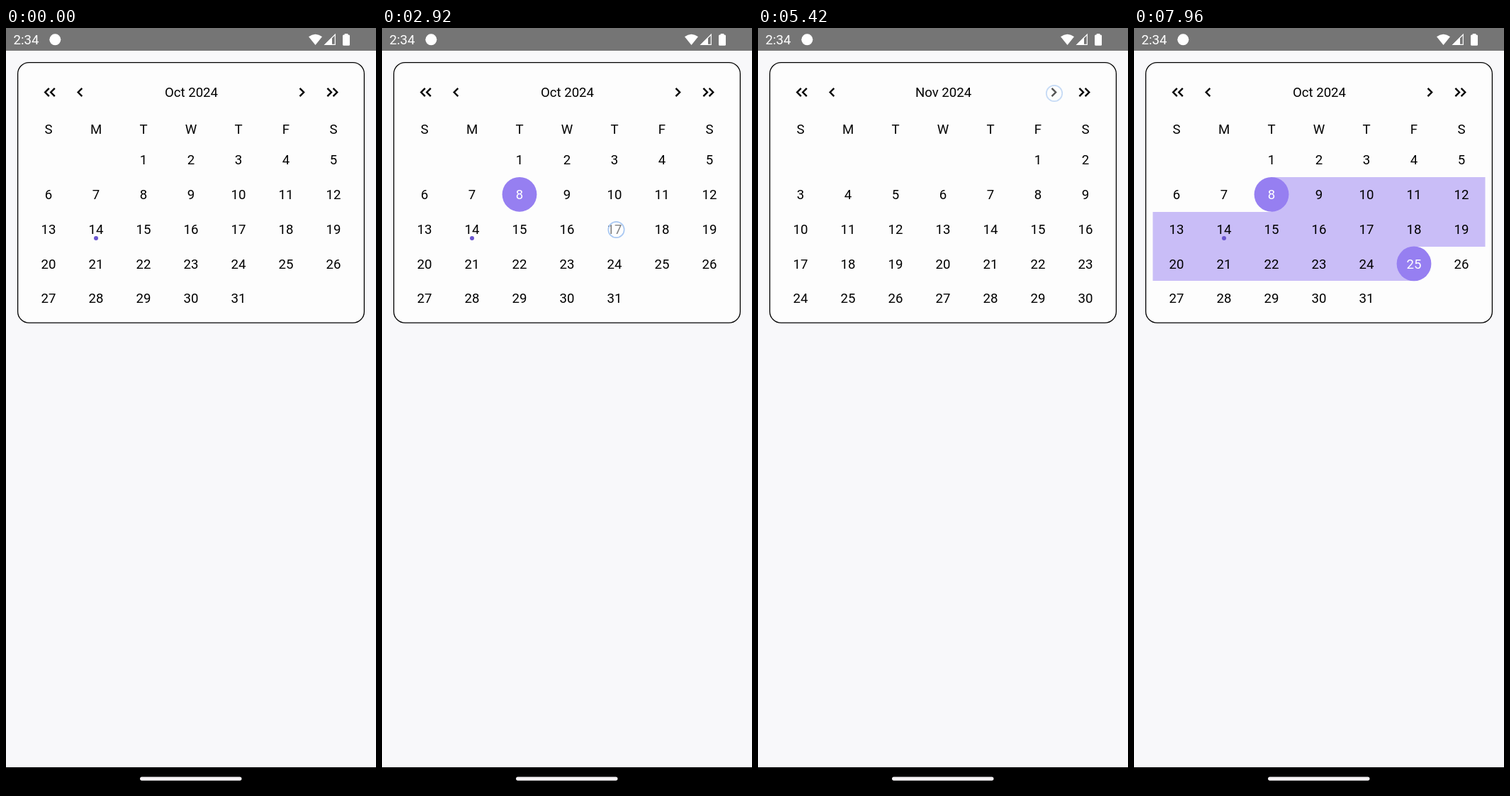
Recreate the animation shown at these times as an HTML page with a canvas. Size 522 by 1073 pixels, loop 8000 ms.

```html
<!DOCTYPE html>
<html lang="en">
<head>
<meta charset="utf-8">
<title>Calendar range picker</title>
<style>
  html, body { margin: 0; width: 100%; height: 100%; overflow: hidden; background: #f8f8fa; }
  canvas { display: block; width: 522px; height: 1073px; }
</style>
</head>
<body>
<canvas id="stage"></canvas>
<script>
const WIDTH = 522, HEIGHT = 1073, LOOP = 8000;
const LEFT = 26.5, TOP = 161.1, CELL_W = 67, CELL_H = 48.8;
const ARROW_Y = 90.5;
const MONTHS = ['Jan', 'Feb', 'Mar', 'Apr', 'May', 'Jun', 'Jul', 'Aug', 'Sep', 'Oct', 'Nov', 'Dec'];

// Each tap changes the calendar at the moment of release.
const TAPS = [
  { release: 1930, x: 195, y: 235, set: { start: 8 } },
  { release: 2960, x: 330.5, y: 284, set: { end: 17 } },
  { release: 4440, x: 396, y: 333, set: { end: 25 } },
  { release: 5380, x: 418, y: 92, button: 417.5, set: { month: 10 } },
  { release: 6320, x: 461, y: 92, button: 460.5, set: { year: 2025 } },
  { release: 6980, x: 62, y: 92, button: 61.5, set: { year: 2024 } },
  { release: 7400, x: 105, y: 92, button: 104.5, set: { month: 9 } }
];

const canvas = document.getElementById('stage');
const ctx = canvas.getContext('2d');
const ratio = window.devicePixelRatio || 1;
canvas.width = WIDTH * ratio;
canvas.height = HEIGHT * ratio;

const clamp = v => Math.max(0, Math.min(1, v));
const easeOut = v => 1 - (1 - clamp(v)) ** 3;
const columnX = column => LEFT + (column + 0.5) * CELL_W;
const rowTop = row => Math.round(TOP + row * CELL_H);

function rect(x, y, w, h, color) {
  ctx.fillStyle = color;
  ctx.fillRect(x, y, w, h);
}

function roundRect(x, y, w, h, r, fill, stroke) {
  ctx.beginPath();
  ctx.roundRect(x, y, w, h, r);
  ctx.fillStyle = fill;
  ctx.fill();
  if (stroke) {
    ctx.strokeStyle = stroke;
    ctx.lineWidth = 1.3;
    ctx.stroke();
  }
}

function circle(x, y, r, color) {
  ctx.beginPath();
  ctx.arc(x, y, r, 0, Math.PI * 2);
  ctx.fillStyle = color;
  ctx.fill();
}

function polygon(color, ...points) {
  ctx.beginPath();
  points.forEach(([x, y]) => ctx.lineTo(x, y));
  ctx.closePath();
  ctx.fillStyle = color;
  ctx.fill();
}

function text(string, x, centerY, color = '#000', align = 'center') {
  ctx.font = '18.6px Roboto, sans-serif';
  ctx.textAlign = align;
  ctx.fillStyle = color;
  ctx.fillText(string, x, centerY + 6.6);
}

function chevron(x, direction) {
  ctx.beginPath();
  ctx.moveTo(x - 2.8 * direction, ARROW_Y - 5.6);
  ctx.lineTo(x + 2.8 * direction, ARROW_Y);
  ctx.lineTo(x - 2.8 * direction, ARROW_Y + 5.6);
  ctx.strokeStyle = '#000';
  ctx.lineWidth = 2.4;
  ctx.stroke();
}

function drawSystemBars() {
  rect(0, 0, WIDTH, 32, '#757575');
  text('2:34', 10.5, 16.5, '#fff', 'left');
  circle(69.3, 16.3, 8, '#fff');

  ctx.beginPath();
  ctx.moveTo(436.5, 24);
  ctx.lineTo(427, 12.3);
  ctx.quadraticCurveTo(436.5, 5.2, 446, 12.3);
  ctx.fillStyle = '#fff';
  ctx.fill();

  polygon('#fff', [449, 24], [460, 13], [460, 24]);
  ctx.beginPath();
  ctx.moveTo(450, 23.4);
  ctx.lineTo(464.3, 9.3);
  ctx.lineTo(464.3, 23.4);
  ctx.closePath();
  ctx.strokeStyle = '#fff';
  ctx.lineWidth = 1.2;
  ctx.stroke();

  roundRect(475, 9.5, 10, 15.3, 1.5, '#fff');
  rect(477.7, 8, 4.6, 2, '#fff');

  rect(0, 1041, WIDTH, 32, '#000');
  roundRect(189, 1054.4, 143.5, 5.3, 2.65, '#f4f1f4');
}

function drawRange(firstSlot, lastSlot) {
  for (let row = Math.floor(firstSlot / 7); row <= Math.floor(lastSlot / 7); row++) {
    const from = firstSlot < row * 7 ? LEFT : columnX(firstSlot - row * 7);
    const to = lastSlot >= row * 7 + 7 ? LEFT + 7 * CELL_W : columnX(lastSlot - row * 7);
    rect(from, rowTop(row), to - from, rowTop(row + 1) - rowTop(row), '#c9bdf7');
  }
}

function drawCalendar({ year, month, start, end }) {
  const offset = new Date(year, month, 1).getDay();
  const days = new Date(year, month + 1, 0).getDate();
  const rows = Math.ceil((offset + days) / 7);
  const isOctober = year === 2024 && month === 9;

  roundRect(16.6, 48.6, 488.8, 122.6 + rows * CELL_H, 16, '#fdfdfd', '#000');
  text(`${MONTHS[month]} ${year}`, 261.5, ARROW_Y);
  [58, 66, 104.5].forEach(x => chevron(x, -1));
  [417.3, 456.2, 464.4].forEach(x => chevron(x, 1));
  [...'SMTWTFS'].forEach((letter, column) => text(letter, columnX(column), 142));

  if (isOctober && end) drawRange(offset + start - 1, offset + end - 1);
  for (let day = 1; day <= days; day++) {
    const slot = offset + day - 1;
    const x = columnX(slot % 7);
    const y = TOP + (Math.floor(slot / 7) + 0.5) * CELL_H;
    const selected = isOctober && (day === start || day === end);
    if (selected) circle(x, y, CELL_H / 2, '#967ff1');
    text(day, x, y, selected ? '#fff' : '#000');
    if (isOctober && day === 14) circle(x, y + 13, 3, '#6a55cf');
  }
}

function drawRipple(tap, t) {
  const age = t - tap.release - 60;
  if (!tap.button || age < 0 || age > 410) return;
  const alpha = 0.12 * clamp(age / 75) * (1 - clamp((age - 260) / 150));
  circle(tap.button, ARROW_Y, 21.5 * (0.3 + 0.7 * easeOut(age / 180)), `rgba(28,27,31,${alpha})`);
}

function drawTouch(tap, t) {
  const age = t - tap.release;
  if (age < -100 || age > 120) return;
  ctx.globalAlpha = 1 - clamp(age / 120);
  circle(tap.x, tap.y, 11.2, 'rgba(255,255,255,.5)');
  ctx.strokeStyle = '#a9c8f2';
  ctx.lineWidth = 1.7;
  ctx.stroke();
  ctx.globalAlpha = 1;
}

function draw(t) {
  const state = { year: 2024, month: 9 };
  TAPS.filter(tap => t >= tap.release).forEach(tap => Object.assign(state, tap.set));

  ctx.setTransform(ratio, 0, 0, ratio, 0, 0);
  rect(0, 0, WIDTH, HEIGHT, '#f8f8fa');
  drawSystemBars();
  drawCalendar(state);
  TAPS.forEach(tap => drawRipple(tap, t));
  TAPS.forEach(tap => drawTouch(tap, t));
}

const began = performance.now();
function tick() {
  draw((performance.now() - began) % LOOP);
  requestAnimationFrame(tick);
}
tick();
</script>
</body>
</html>
```
